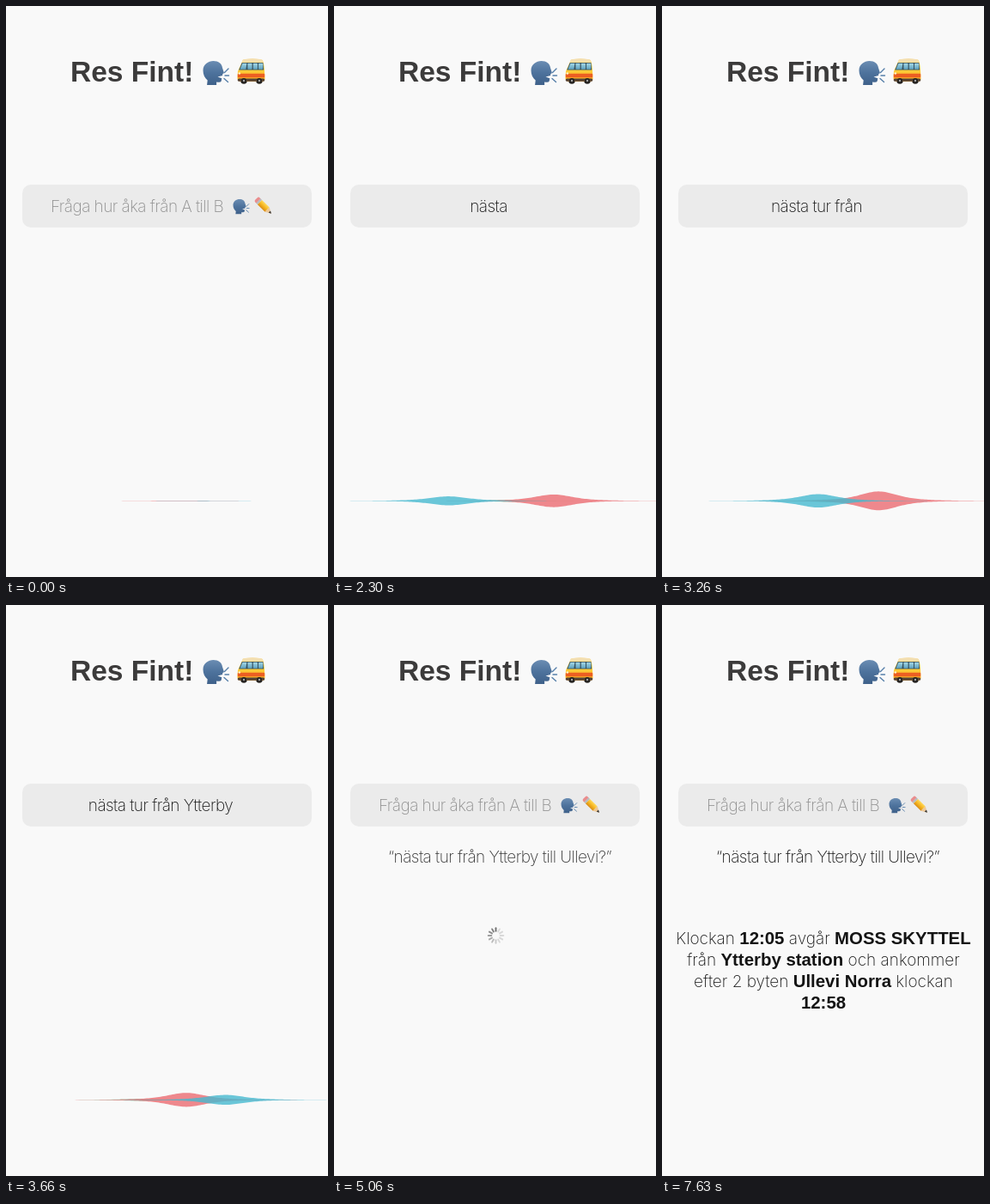
An HTML page with a canvas that plays this animation: 375 by 665 pixels, repeating every 9.63 s.

```html
<!DOCTYPE html>
<html lang="sv">
<head>
<meta charset="utf-8">
<title>Reseassistent</title>
<style>
  html, body { margin: 0; width: 100%; height: 100%; overflow: hidden; background: #f9f9f9; }
  canvas { display: block; width: 375px; height: 665px; }
</style>
</head>
<body>
<canvas id="stage"></canvas>
<script>
const W = 375, H = 665, LOOP = 9630;
const canvas = document.getElementById('stage');
const ctx = canvas.getContext('2d');
const dpr = window.devicePixelRatio || 1;
canvas.width = W * dpr;
canvas.height = H * dpr;

const THIN = '200 19px Inter, "Helvetica Neue", sans-serif';
const INPUT = { font: THIN, gap: '-0.55px' };
const BODY = { font: THIN, gap: '0px' };
const BOLD = { font: 'bold 20.4px "Liberation Sans", Arial, sans-serif', gap: '0px' };
const TITLE = { font: 'bold 33.5px "Liberation Sans", Arial, sans-serif', gap: '0px' };

const HINT = 'Fråga hur åka från A till B';
const QUERY = 'nästa tur från Ytterby till Ullevi';
const WORD_TIMES = [2130, 2470, 2980, 3350, 3820, 4090];
const LISTEN = 1800, HUSH = 4280, SENT = 4930, ANSWER = 7630;

// Segments between asterisks are bold.
const REPLY = [
  'Klockan *12:05* avgår *MOSS SKYTTEL*',
  'från *Ytterby station* och ankommer',
  'efter 2 byten *Ullevi Norra* klockan',
  '*12:58*'
];

const TAU = Math.PI * 2;
const clamp = v => Math.max(0, Math.min(1, v));
const swing = (t, peak, period) => Math.cos(TAU * (t - peak) / period);

function setStyle(style, color) {
  ctx.font = style.font;
  ctx.letterSpacing = style.gap;
  ctx.fillStyle = color;
}

function text(str, x, y, style, color, align = 'left') {
  setStyle(style, color);
  ctx.textAlign = align;
  ctx.fillText(str, x, y);
}

function richLine(line, cx, y) {
  const parts = line.split('*').map((str, i) => {
    const style = i % 2 ? BOLD : BODY;
    setStyle(style, '#000');
    return { str, style, width: ctx.measureText(str).width };
  });
  let x = cx - parts.reduce((sum, p) => sum + p.width, 0) / 2;
  for (const p of parts) {
    text(p.str, x, y, p.style, '#141414');
    x += p.width;
  }
}

function at(x, y, scale, draw) {
  ctx.save();
  ctx.translate(x, y);
  ctx.scale(scale, scale);
  draw();
  ctx.restore();
}

function box(x, y, w, h, r, fill) {
  ctx.fillStyle = fill;
  ctx.beginPath();
  ctx.roundRect(x, y, w, h, r);
  ctx.fill();
}

function disc(x, y, r, fill) {
  ctx.fillStyle = fill;
  ctx.beginPath();
  ctx.arc(x, y, r, 0, TAU);
  ctx.fill();
}

function shape(path, fill) {
  ctx.fillStyle = fill;
  ctx.fill(new Path2D(path));
}

function shade(y0, y1, ...colors) {
  const g = ctx.createLinearGradient(0, y0, 0, y1);
  colors.forEach((c, i) => g.addColorStop(i / (colors.length - 1), c));
  return g;
}

function head() {
  shape('M0 11C0 4 6 0 12 0C18 0 22 3 22.5 8L24.3 13.5Q24.5 14.6 22.8 15' +
    'L22.6 17L17 18.6L21.8 20.2L21.2 23.4Q20.6 25.2 15.6 24.4L15.6 28L4.6 28L5.2 22.4C2 20 0 16 0 11Z',
    shade(0, 28, '#6b8db3', '#4d729c', '#3f618a'));
  ctx.strokeStyle = '#567fa9';
  ctx.lineWidth = 1.4;
  ctx.lineCap = 'round';
  ctx.stroke(new Path2D('M25 13.5L29.5 9M25.5 17L30 17M24.5 20.5L29 24.5'));
}

function bus() {
  for (const x of [8, 26]) disc(x, 26, 3.8, '#2b2825');
  shape('M7 1.5Q18 0 29 1.5Q31.5 3 32 14L32.5 24Q32 27 29 27L4 27Q.5 26.5 .5 23L1 15Z',
    shade(1, 27, '#ffe07a', '#ffcf3a', '#f9a51c'));
  shape('M7 1.5Q18 -1.5 29 1.5L30.5 4.5L5.5 4.5Z', '#f4dfb0');
  shape('M5.8 5L30.4 5L31.2 13.5L2.2 13.5Z', '#35505f');
  shape('M6.4 5.8L11.4 5.8L10.4 12.8L3.4 12.8Z', shade(5, 13, '#a9dcea', '#5c9fbd'));
  for (const x of [12.4, 18.8, 25]) box(x, 5.8, 5.2, 7, .8, shade(5, 13, '#a9dcea', '#5c9fbd'));
  box(.8, 17.8, 31.4, 4.4, 1, '#ec5f22');
  box(.8, 23.4, 31.4, 3.4, 1.5, '#544236');
  for (const x of [8, 26]) {
    disc(x, 26, 3, '#24211f');
    disc(x, 26, 1.2, '#a5a5a5');
  }
  disc(2.8, 17.5, 1.3, '#fff4c4');
}

function pencil() {
  ctx.rotate(.78);
  box(0, -4, 4, 8, [2, 0, 0, 2], '#ea8d8d');
  box(3.6, -4, 2.6, 8, 0, '#b9bcc0');
  box(6.2, -4, 13.2, 8, 0, shade(-4, 4, '#ffd95c', '#f7b823', '#d98c13'));
  shape('M19.4 -4L26.5 0L19.4 4Z', '#edc795');
  shape('M23.5 -1.7L26.8 0L23.5 1.7Z', '#333');
}

function hint() {
  text(HINT, 52, 240, INPUT, '#8f8f8f');
  at(264.5, 225, .62, head);
  at(291.5, 224.5, .92, pencil);
}

// Loudness swells while the phrase is spoken, with a ripple for the syllables.
function loudness(t) {
  const phrase = Math.sin(Math.PI * clamp((t - LISTEN) / (HUSH - LISTEN))) ** .6;
  const ripple = 1 - .35 * swing(t, 2760, 450);
  const idle = .15 + .06 * clamp(1 - t / 130);
  return 12.5 * phrase * ripple + idle * clamp((4720 - t) / 300);
}

function lobe(center, height, width, color) {
  const mid = 576.3;
  const half = x => height / (1 + ((x - center) / width) ** 2) ** 2;
  ctx.fillStyle = color;
  ctx.beginPath();
  for (let x = 0; x <= W; x += 2) ctx.lineTo(x, mid - half(x));
  for (let x = W + 1; x >= 0; x -= 2) ctx.lineTo(x, mid + half(x));
  ctx.fill();
}

function wave(t) {
  const level = loudness(t);
  if (level <= 0) return;
  const width = 42 + 40 * Math.exp(-level);
  const now = Math.max(t, LISTEN);
  const teal = 190 + 85 * swing(now, 3950, 2600);
  const red = 200 + 75 * swing(now, 2760, 3930);
  lobe(red - 50, level * .2, width, 'rgba(110,200,150,.6)');
  lobe(red, level * 1.2, width, 'rgba(236,112,118,.82)');
  lobe(teal, level * .85, width, 'rgba(70,186,208,.8)');
}

function spinner(t) {
  const lead = 3 + Math.floor((t - 6260) / 83.3);
  ctx.save();
  ctx.translate(188.5, 385);
  ctx.lineWidth = 1.9;
  ctx.lineCap = 'round';
  for (let i = 0; i < 12; i++) {
    const age = (((lead - i) % 12) + 12) % 12;
    const tone = Math.round(90 + 120 * Math.min(1, age / 7));
    ctx.strokeStyle = `rgb(${tone},${tone},${tone})`;
    ctx.beginPath();
    ctx.moveTo(0, -5.2);
    ctx.lineTo(0, -8.8);
    ctx.stroke();
    ctx.rotate(TAU / 12);
  }
  ctx.restore();
}

function draw(t) {
  ctx.setTransform(dpr, 0, 0, dpr, 0, 0);
  ctx.globalAlpha = 1;
  ctx.fillStyle = '#f9f9f9';
  ctx.fillRect(0, 0, W, H);

  text('Res Fint!', 75, 88, TITLE, '#3c3b3b');
  at(229.5, 64, 1, head);
  at(269, 61, 1, bus);
  box(19, 208, 337, 50, 10, '#ebebeb');

  const spoken = WORD_TIMES.filter(w => t >= w).length;
  if (!spoken || t >= SENT) hint();
  else text(QUERY.split(' ').slice(0, spoken).join(' '), 180, 240, INPUT, '#141414', 'center');

  wave(t);

  if (t >= SENT) {
    ctx.globalAlpha = clamp((t - SENT + 40) / 200);
    text('“' + QUERY + '?”', 193, 300, INPUT, '#141414', 'center');
    if (t < ANSWER) spinner(t);
    ctx.globalAlpha = 1;
  }
  if (t >= ANSWER) REPLY.forEach((line, i) => richLine(line, 188, 394.5 + i * 25));
}

const start = performance.now();
function tick() {
  draw((performance.now() - start) % LOOP);
  requestAnimationFrame(tick);
}
tick();
</script>
</body>
</html>
```
